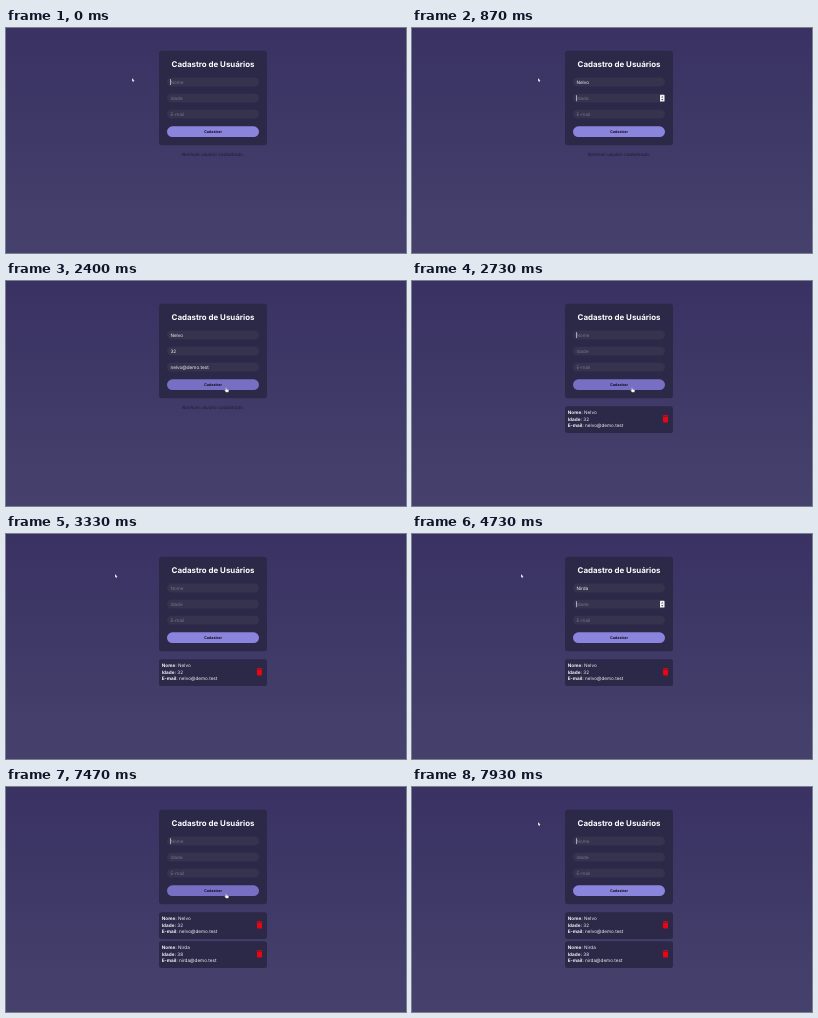
An HTML page that plays this animation: 400 by 225 pixels, repeating every 8000 ms.

```html
<!DOCTYPE html>
<html lang="pt-BR">
<head>
<meta charset="utf-8">
<title>Cadastro de Usuários</title>
<style>
  html, body { margin: 0; width: 100%; height: 100%; overflow: hidden; background: #3d3768; }
  svg { display: block; width: 100%; height: 100%; }
  text { font: 4.65px Inter, "Open Sans", sans-serif; fill: #f1f0f6; text-rendering: geometricPrecision; white-space: pre; }
  .title { font-size: 7.9px; font-weight: 700; fill: #fff; }
  .label { font-weight: 700; }
  .middle { text-anchor: middle; }
  .placeholder { fill: #77738c; }
  .submit { font-size: 3.75px; font-weight: 700; fill: #151225; }
  .empty { font-size: 4.5px; font-style: italic; fill: #1d1a35; }
  .card { fill: #2b2947; }
  .input { fill: #36334f; }
</style>
</head>
<body>
<svg viewBox="0 0 400 225" preserveAspectRatio="none">
  <defs>
    <linearGradient id="sky" x2="0" y2="1">
      <stop stop-color="#393263"/>
      <stop offset="1" stop-color="#46416c"/>
    </linearGradient>
  </defs>
  <rect width="400" height="225" fill="url(#sky)"/>
  <rect class="card" x="153" y="22.8" width="108" height="94.4" rx="3"/>
  <text class="title middle" x="207" y="38.7">Cadastro de Usuários</text>
  <g id="form"></g>
  <g id="spinner">
    <rect x="248" y="66.8" width="4.5" height="6.8" rx=".6" fill="#f4f4f6"/>
    <path d="M249.1 69.4l1.15-1.4 1.15 1.4zM249.1 71l1.15 1.4 1.15-1.4z" fill="#55555c"/>
  </g>
  <rect id="caret" width=".6" height="6" fill="#f1f0f6"/>
  <rect id="button" x="161" y="98.3" width="92" height="10.8" rx="5.4"/>
  <text class="submit middle" x="207" y="105">Cadastrar</text>
  <text id="empty" class="empty middle" x="207" y="127.6">Nenhum usuário cadastrado.</text>
  <g id="list"></g>
  <path id="arrow" d="M0 0V3.7L.9 2.9 1.6 4.3 2.2 4 1.6 2.7H2.7Z" fill="#fff" stroke="#222" stroke-width=".2"/>
  <path id="hand" d="M.5 .5Q1 -.2 1.5 .5V2L3.6 2.5Q4 2.7 3.8 3.6L3.3 5H1L-.5 3.1Q-.3 2.4 .5 3Z" fill="#fff" stroke="#222" stroke-width=".2"/>
</svg>
<script>
const LOOP = 8000;
const TEXT_X = 164.4;
const labels = ['Nome', 'Idade', 'E-mail'];
const byId = id => document.getElementById(id);

// Each typing run is [start, ms per character, text].
const users = [
  {
    tabs: [800, 1400], submit: 2600,
    runs: [[[330, 70, 'Nelvo']], [[1130, 130, '32']], [[1440, 45, 'nelvo@demo.test']]],
  },
  {
    tabs: [4270, 5530], submit: 7270,
    runs: [[[3600, 115, 'Nirda']], [[5270, 200, '38']], [[5600, 80, 'nirda'], [6200, 44, '@demo.test']]],
  },
];

const caretOff = [[2270, 2600], [3070, 3530], [4470, 4730], [4930, 5130], [6870, 7130], [7270, 7470]];

// Pointer stops: [time, x, y].
const path = [
  [2200, 126, 50], [2400, 219, 106.3], [2730, 219, 106.3], [3070, 129, 54], [3270, 109, 40],
  [6800, 109, 40], [7070, 219, 106.3], [7470, 219, 106.3], [7670, 175, 93], [7870, 126, 35],
];

function add(parent, tag, attributes, content = '') {
  const node = document.createElementNS('http://www.w3.org/2000/svg', tag);
  for (const name in attributes) node.setAttribute(name, attributes[name]);
  node.textContent = content;
  return parent.appendChild(node);
}

const show = (node, visible) => node.setAttribute('visibility', visible ? 'visible' : 'hidden');

const fieldTop = i => 49.6 + i * 16.1;
const fields = labels.map((label, i) => {
  add(byId('form'), 'rect', { class: 'input', x: 161, y: fieldTop(i), width: 92, height: 8.8, rx: 4.4 });
  return add(byId('form'), 'text', { x: TEXT_X, y: fieldTop(i) + 6.1 });
});

const cards = users.map((user, n) => {
  const card = add(byId('list'), 'g', { transform: `translate(0 ${n * 29})` });
  add(card, 'rect', { class: 'card', x: 153, y: 125.3, width: 108, height: 26.6, rx: 2.5 });
  labels.forEach((label, i) => {
    const line = add(card, 'text', { x: 155.8, y: 133 + i * 6.7 });
    add(line, 'tspan', { class: 'label' }, label + ':');
    add(line, 'tspan', {}, ' ' + user.runs[i].map(run => run[2]).join(''));
  });
  add(card, 'path', {
    d: 'M250.6 134.5H252.3L252.7 134H254.3L254.7 134.5H256.4V135.4H250.6ZM251 135.9H256V140.6Q256 141.4 255.2 141.4H251.8Q251 141.4 251 140.6Z',
    fill: '#e90612',
  });
  return card;
});

function typed(runs, t) {
  return runs.map(([start, step, text]) =>
    text.slice(0, Math.max(0, Math.floor((t - start) / step) + 1))).join('');
}

function pointerAt(t) {
  const next = path.findIndex(stop => stop[0] > t);
  if (next < 0) return path[path.length - 1].slice(1);
  if (next === 0) return path[0].slice(1);
  const [t0, x0, y0] = path[next - 1];
  const [t1, x1, y1] = path[next];
  const p = (t - t0) / (t1 - t0);
  const eased = p * p * (3 - 2 * p);
  return [x0 + (x1 - x0) * eased, y0 + (y1 - y0) * eased];
}

function render(t) {
  const user = users.find(u => t < u.submit);
  const focus = user ? user.tabs.filter(tab => t >= tab).length : 0;

  fields.forEach((field, i) => {
    const value = user ? typed(user.runs[i], t) : '';
    field.textContent = value || labels[i];
    field.setAttribute('class', value ? '' : 'placeholder');
    if (i === focus) {
      const caretX = TEXT_X + (value ? field.getComputedTextLength() + 0.2 : -0.2);
      byId('caret').setAttribute('x', caretX);
      byId('caret').setAttribute('y', fieldTop(i) + 1.5);
    }
  });
  show(byId('caret'), !caretOff.some(([from, to]) => t >= from && t < to));
  show(byId('spinner'), focus === 1);

  show(byId('empty'), t < users[0].submit);
  cards.forEach((card, n) => show(card, t >= users[n].submit));

  const [x, y] = pointerAt(t);
  const hover = x > 161 && x < 253 && y > 98 && y < 109;
  byId('button').setAttribute('fill', hover ? '#766fc3' : '#8a84dc');
  for (const id of ['arrow', 'hand']) {
    byId(id).setAttribute('transform', `translate(${x} ${y})`);
    show(byId(id), (id === 'hand') === hover);
  }
}

// The screen refreshes 15 times per second, on times rounded to 10 ms.
const refreshTime = t => Math.round(Math.floor((t + 4) * 0.015) / 0.15) * 10;

let start;
function tick(now) {
  start ??= now;
  render(refreshTime((now - start) % LOOP));
  requestAnimationFrame(tick);
}
render(0);
requestAnimationFrame(tick);
</script>
</body>
</html>
```
